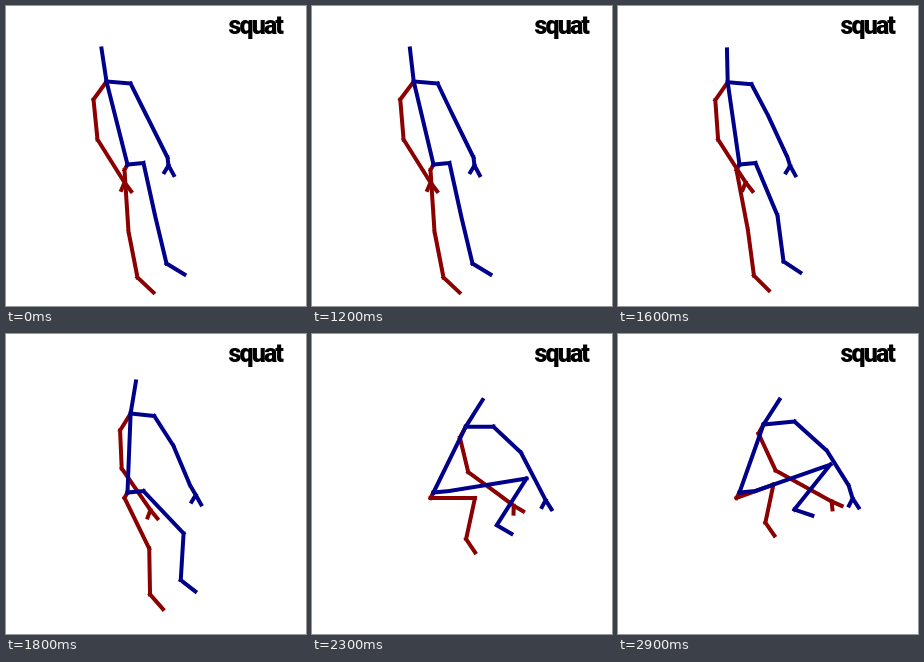
These frames come from a looping animation (300x300 px, 3000 ms). An HTML page:

```html
<!DOCTYPE html>
<html lang="en">
<head>
<meta charset="utf-8">
<title>Squat</title>
<style>
  html, body { margin: 0; width: 100%; height: 100%; overflow: hidden; background: #fff; }
  svg { display: block; width: 100%; height: 100%; }
  path { fill: none; stroke-width: 4; stroke-linecap: square; }
  text { font: 900 25px Roboto, "Open Sans", sans-serif; letter-spacing: -1.85px; }
</style>
</head>
<body>
<svg id="stage" viewBox="0 0 300 300">
  <text x="222.5" y="27.6">squat</text>
  <g id="body" transform="translate(.5 .5)"></g>
</svg>
<script>
const LOOP = 3000, STEP = 100;
const REST = 900, BEND = 1400, SQUAT = 2100, LOW = 2600;
const BLUE = '#00008b', RED = '#8b0000';
const PELVIS = [121, 158], L_HIP = [137, 156.5], R_HIP = [118, 163.5];

// Key points per joint: standing, squatting, lowest.
const trunk = {
  chest: [[100, 75], [155, 91], [152, 93]],
  head: [[95, 42], [173, 62], [168, 68]],
  lShoulder: [[124, 77], [178, 95], [183, 90]],
  rShoulder: [[87, 93], [148, 105], [147, 102]]
};
const arms = {
  lElbow: [[140, 109], [202, 118], [213, 118]],
  lWrist: [[161, 151], [213, 149], [235, 153]],
  lHand: [[162, 159], [225, 165], [239, 166]],
  rElbow: [[91, 133], [147, 137], [162, 138]],
  rHand: [[118, 176], [178, 174], [218, 169]]
};
const legs = {
  lKnee: [[149, 211], [214, 162], [214, 131]],
  lAnkle: [[160, 257], [193, 211], [178, 176]],
  lToe: [[178, 268], [203, 223], [196, 182]],
  rKnee: [[122, 225], [170, 181], [157, 151]],
  rAnkle: [[131, 271], [160, 226], [149, 189]],
  rToe: [[147, 286], [169, 240], [158, 202]]
};

// Listed from back to front.
const limbs = [
  [RED, 'pelvis rHip rKnee rAnkle rToe'],
  [RED, 'chest rShoulder rElbow rWrist rHand rTip', 'rHand rThumb'],
  [BLUE, 'pelvis lHip lKnee lAnkle lToe'],
  [BLUE, 'pelvis chest neck head'],
  [BLUE, 'chest lShoulder lElbow lWrist lHand lTip', 'lHand lThumb']
];

const body = document.getElementById('body');
const paths = limbs.map(([color]) => {
  const p = document.createElementNS(body.namespaceURI, 'path');
  p.setAttribute('stroke', color);
  return body.appendChild(p);
});

const part = (t, a, b) => Math.min(1, Math.max(0, (t - a) / (b - a)));
const mix = (a, b, u) => a + (b - a) * u;
const between = (p, q, u) => [mix(p[0], q[0], u), mix(p[1], q[1], u)];

// A finger that continues the forearm, turned by some degrees.
function finger(elbow, hand, length, turn) {
  const a = Math.atan2(hand[1] - elbow[1], hand[0] - elbow[0]) + turn * Math.PI / 180;
  return [hand[0] + length * Math.cos(a), hand[1] + length * Math.sin(a)];
}

function pose(t) {
  const down = part(t, BEND, SQUAT);
  const settle = 1 - (1 - part(t, SQUAT, LOW)) ** 1.7;
  const back = part(t, LOW, LOW + 300);
  const sway = t < REST ? 0 : (2.6 + 0.4 * Math.cos((t - REST) / 150)) * (1 - down);
  const p = { pelvis: PELVIS, lHip: L_HIP, rHip: R_HIP };

  // The body leans forward before it drops; at the end it drifts back.
  function add(joints, drift) {
    for (const name in joints) {
      const [stand, squat, low] = joints[name];
      const lean = sway * Math.max(0, (PELVIS[1] - stand[1]) / 116) ** 2;
      const x = mix(stand[0] + lean, squat[0], down ** 1.5);
      const y = mix(stand[1], squat[1], down ** 2.5);
      p[name] = [
        x + (low[0] - squat[0]) * settle - 7 * drift * back,
        y + (low[1] - squat[1]) * settle - 3 * drift * back
      ];
    }
  }
  add(trunk, 1);
  add(arms, 0.7);
  add(legs, 0.3);

  p.neck = between(p.chest, p.head, 0.35);
  p.rWrist = between(p.rElbow, p.rHand, 0.75);
  for (const s of ['l', 'r']) {
    p[s + 'Tip'] = finger(p[s + 'Elbow'], p[s + 'Hand'], 11, -5);
    p[s + 'Thumb'] = finger(p[s + 'Elbow'], p[s + 'Hand'], 8, 55);
  }
  return p;
}

function bones(chain, p) {
  const pts = chain.split(' ').map(n => p[n].map(c => c.toFixed(2)).join(' '));
  return pts.slice(1).map((q, i) => `M${pts[i]}L${q}`).join('');
}

function draw(ms) {
  const p = pose(Math.floor((ms % LOOP) / STEP) * STEP);
  limbs.forEach(([, ...chains], i) =>
    paths[i].setAttribute('d', chains.map(c => bones(c, p)).join('')));
}

const start = performance.now();
function tick() {
  draw(performance.now() - start);
  requestAnimationFrame(tick);
}
tick();
</script>
</body>
</html>
```
